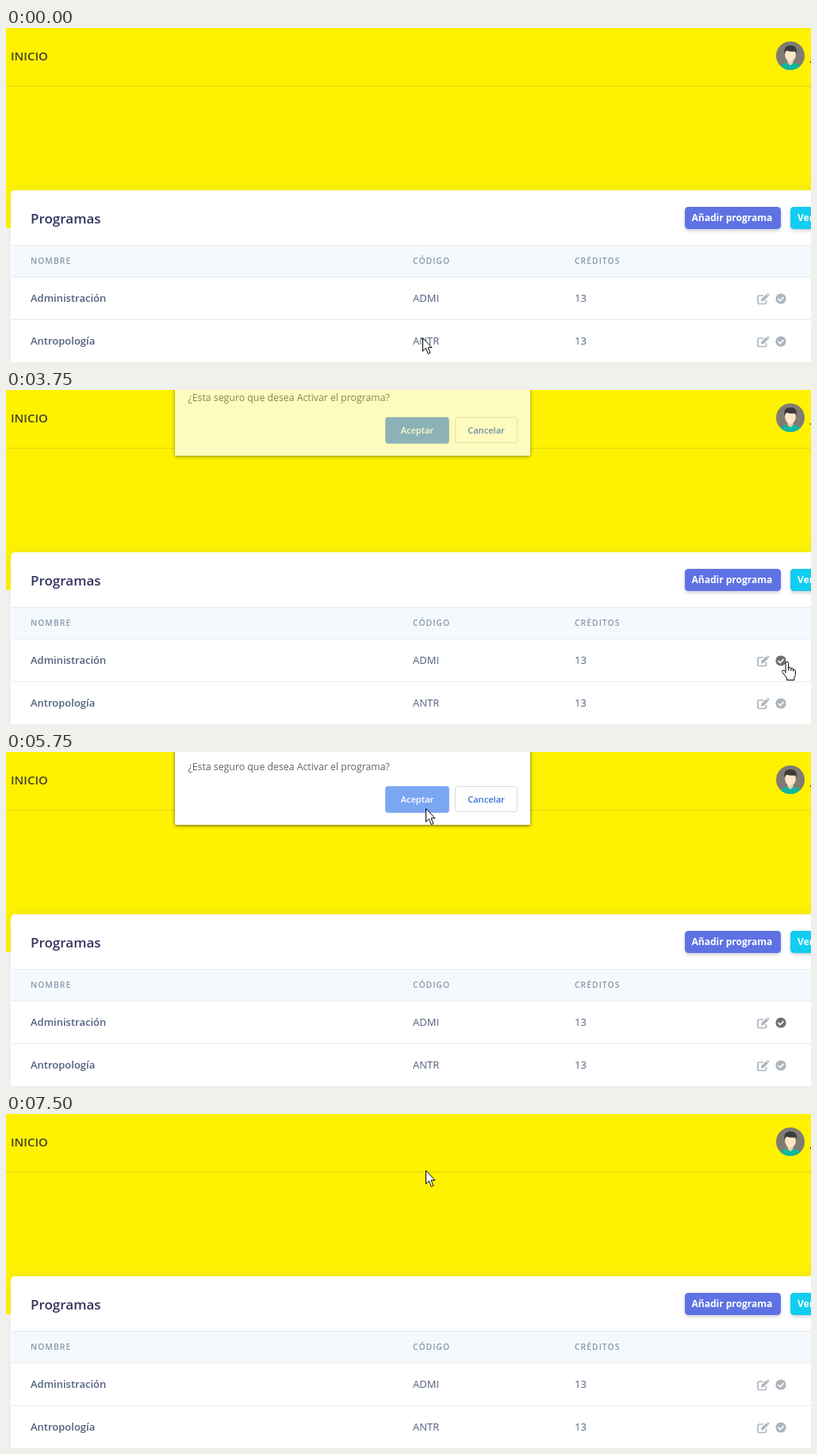
An HTML page that plays this animation: 1015x422 px, repeating every 8000 ms.

```html
<!DOCTYPE html>
<html lang="es">
<head>
<meta charset="utf-8">
<title>Programas</title>
<style>
  html, body { margin: 0; width: 100%; height: 100%; overflow: hidden; background: #fef200; }
  svg { display: block; width: 1015px; height: 422px; font-family: "Open Sans", "Noto Sans", sans-serif; }
  .head { font-size: 10.4px; font-weight: 600; letter-spacing: 1px; fill: #8898aa; }
  .cell { font-size: 13px; fill: #525f7f; }
  .name { font-weight: 600; }
  .btn { font-size: 12px; font-weight: 700; fill: #fff; }
  .ask { font-size: 12.3px; fill: #5f6368; }
  .choice { font-size: 11.1px; font-weight: 600; text-anchor: middle; }
  .raised { filter: drop-shadow(0 2px 2px rgba(50, 50, 93, .25)); }
  #card { filter: drop-shadow(0 0 8px rgba(136, 152, 170, .15)); }
  #box { filter: drop-shadow(0 1px 2px rgba(0, 0, 0, .6)); }
</style>
</head>
<body>
<svg viewBox="0 0 1015 422">
  <defs>
    <clipPath id="round"><circle cx="989" cy="35" r="18"/></clipPath>
    <g id="edit">
      <path d="M955 -4H949.5Q948 -4 948 -2.5V5Q948 6.5 949.5 6.5H957Q958.5 6.5 958.5 5V2" fill="none" stroke="#adb5bd" stroke-width="1.7"/>
      <path d="M952 3.5L952.5 .3L958.7 -5.6L961.2 -3.1L955.2 3Z" fill="#adb5bd"/>
      <path d="M959.3 -6.1L960 -6.6Q960.7 -6.9 961.3 -6.3L962.3 -5.2Q962.7 -4.6 962.2 -4L961.7 -3.6Z" fill="#adb5bd"/>
    </g>
    <g id="check">
      <circle cx="977" r="6.6"/>
      <path d="M973.6 .2L976.1 2.6L980.5 -1.8" fill="none" stroke="#fff" stroke-width="1.8"/>
    </g>
  </defs>

  <rect width="1015" height="422" fill="#fef200"/>
  <rect y="253" width="1015" height="169" fill="#f3f4fa"/>
  <rect y="73" width="1015" height="1" fill="#e0d51c"/>
  <text x="6" y="41" font-size="15" font-weight="600" fill="#46432c">INICIO</text>

  <g clip-path="url(#round)">
    <rect x="971" y="17" width="36" height="36" fill="#807c74"/>
    <path d="M976 54Q976 45 984 44L989 47L994 44Q1002 45 1002 54Z" fill="#0fb89f"/>
    <path d="M985.5 39H992.5V44L989 47.5L985.5 44Z" fill="#efcfa8"/>
    <ellipse cx="989" cy="34" rx="6.8" ry="8.6" fill="#fde5c6"/>
    <path d="M981.6 33Q979.5 22.5 988 22Q998.8 21.5 996.5 33L995.3 29.5Q989 30.5 984 28.5Q982.3 30 981.6 33Z" fill="#3b3a38"/>
  </g>
  <rect x="1014" y="42" width="1" height="2" fill="#46432c"/>

  <path id="card" d="M6 430V211Q6 205 12 205H1030V430Z" fill="#fff"/>
  <rect x="7" y="274" width="1008" height="41" fill="#f4f9fd"/>
  <g fill="#e6eaee">
    <rect x="7" y="274" width="1008" height="1"/>
    <rect x="7" y="314" width="1008" height="1"/>
    <rect x="7" y="368" width="1008" height="1"/>
  </g>
  <text x="31" y="247" font-size="17" font-weight="600" fill="#32325d">Programas</text>
  <g class="raised">
    <rect x="856" y="226" width="121" height="28" rx="4.5" fill="#5e72e4"/>
    <rect x="989" y="226" width="48" height="28" rx="4.5" fill="#11cdef"/>
  </g>
  <text class="btn" x="864.5" y="244">Añadir programa</text>
  <text class="btn" x="998" y="244">Ver</text>
  <g class="head">
    <text x="31" y="298">NOMBRE</text>
    <text x="513" y="298">CÓDIGO</text>
    <text x="717" y="298">CRÉDITOS</text>
  </g>
  <g id="rows"></g>

  <g id="dialog">
    <path id="box" d="M213 -30H661V91Q661 92 660 92H214Q213 92 213 91Z" fill="#fff"/>
    <text class="ask" x="229.5" y="23">¿Esta seguro que desea Activar el programa?</text>
    <rect id="ok" x="478.5" y="43.5" width="80" height="33" rx="3" stroke="#8db4f5"/>
    <rect x="566.5" y="43.5" width="78" height="32" rx="3" fill="none" stroke="#dadce0"/>
    <text class="choice" x="518.5" y="64" fill="#fff">Aceptar</text>
    <text class="choice" x="605.5" y="64" fill="#3b6fd4">Cancelar</text>
  </g>

  <path id="arrow" d="M.5 .5V17.3L4.4 13.6L7.3 20.6L9.9 19.5L7 12.7H12Z" fill="#fff" stroke="#000" stroke-linejoin="round"/>
  <g id="hand" stroke="#000" stroke-linejoin="round">
    <path d="M5 13V2.4Q5 .5 6.8 .5T8.6 2.4V7.6Q11.2 6.8 11.8 8.6Q14 8 14.6 9.9Q17.3 9.6 17.3 12V16.5Q17.3 18.5 15.8 20.5V23.5H6.6V21Q4 17.5 .9 13.4Q.2 11 2.5 11Q3.6 11.2 5 13Z" fill="#fff"/>
    <path d="M8.6 7.6V11.5M11.8 8.6V12M14.6 9.9V12.5M5 13V15" fill="none"/>
  </g>
</svg>
<script>
  const LOOP = 8000;
  const $ = id => document.getElementById(id);

  // time, pointer, x, y
  const moves = [
    [0, "arrow", 525, 391], [250, "arrow", 520, 384], [1000, "arrow", 561, 385],
    [1250, "arrow", 654, 384], [1500, "arrow", 808, 384], [1750, "arrow", 897, 379],
    [2000, "arrow", 946, 367], [2250, "arrow", 966, 361], [2500, "hand", 973, 338],
    [2750, "hand", 978, 343], [4500, "hand", 775, 212], [4750, "hand", 669, 158],
    [5000, "hand", 580, 104], [5250, "arrow", 547, 84], [5500, "arrow", 529, 71]
  ];
  // time, opacity, vertical offset
  const dialogSteps = [[0, 0, 0], [3750, .75, -9], [4000, 1, 0], [6750, 0, 0]];
  const okSteps = [[0, "#669df6"], [5500, "#74a2f3"], [5750, "#7ba6f1"], [6250, "#7fa8ef"]];
  const checkSteps = [[0, "#adb5bd"], [2500, "#6f7275"], [6500, "#adb5bd"]];

  const at = (steps, t) => steps.filter(s => s[0] <= t).pop();

  $("rows").innerHTML = [["Administración", "ADMI", 342], ["Antropología", "ANTR", 396]].map(([name, code, y], i) => `
    <text class="cell name" x="31" y="${y + 4}">${name}</text>
    <text class="cell" x="513" y="${y + 4}">${code}</text>
    <text class="cell" x="717" y="${y + 4}">13</text>
    <use href="#edit" y="${y}"/>
    <use id="check${i}" href="#check" y="${y}" fill="#adb5bd"/>`).join("");

  function draw(t) {
    const [, kind, x, y] = at(moves, t);
    for (const id of ["arrow", "hand"]) {
      $(id).setAttribute("visibility", id === kind ? "visible" : "hidden");
      $(id).setAttribute("transform", `translate(${x} ${y})`);
    }
    const [, alpha, dy] = at(dialogSteps, t);
    $("dialog").setAttribute("opacity", alpha);
    $("dialog").setAttribute("transform", `translate(0 ${dy})`);
    $("ok").setAttribute("fill", at(okSteps, t)[1]);
    $("check0").setAttribute("fill", at(checkSteps, t)[1]);
  }

  function tick() {
    draw(performance.now() % LOOP);
    requestAnimationFrame(tick);
  }
  tick();
</script>
</body>
</html>
```
